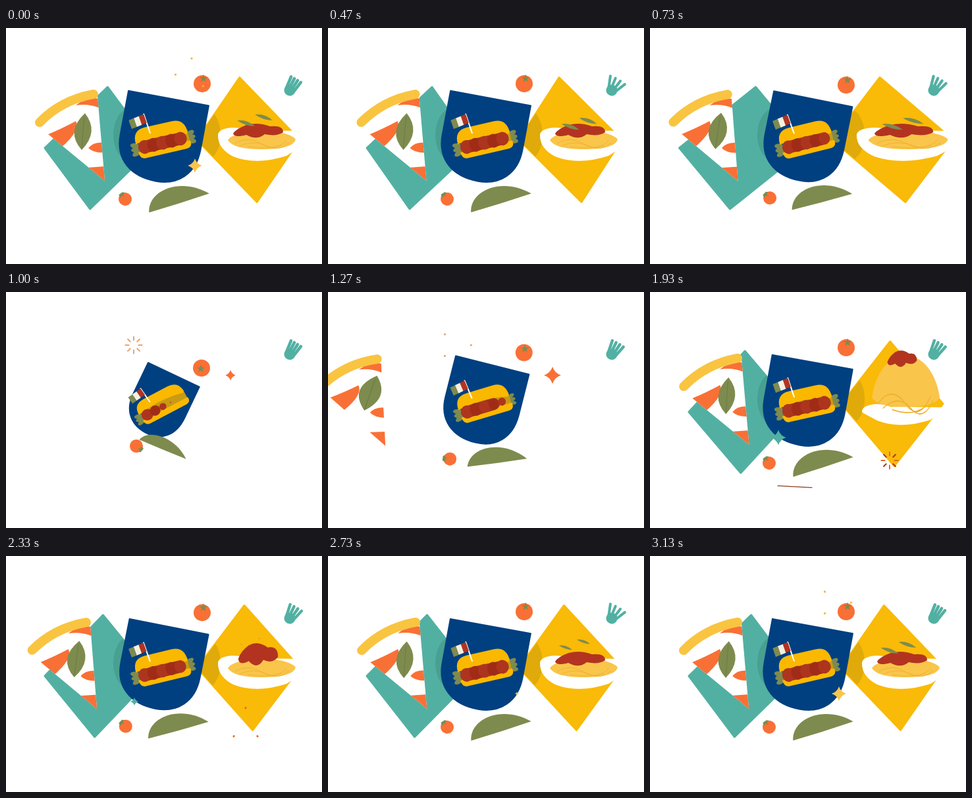
An HTML page with a canvas that plays this animation: 480x360 px, repeating every 3270 ms.

```html
<!DOCTYPE html>
<html lang="en">
<head>
<meta charset="utf-8">
<title>Street food</title>
<style>
  html, body { margin: 0; width: 100%; height: 100%; overflow: hidden; background: #fff; }
  canvas { display: block; }
</style>
</head>
<body>
<canvas id="stage" width="480" height="360"></canvas>
<script>
const ctx = document.getElementById('stage').getContext('2d');
const LOOP = 3270, STEPS = 41, { PI, sin, cos, exp, min, max } = Math;
const TEAL = '#52b0a2', GOLD = '#f9ba08', NAVY = '#004080', ORANGE = '#f97036',
      OLIVE = '#7e8b4e', RED = '#b23420', PASTA = '#f9c54a', WHITE = '#fff', TAN = '#dfa878';

// u: step since everything was hidden; away: springy distance from the rest
// pose (1 = hidden, 0 = at rest); out: the same without overshoot.
let u, away, out;

const ramp = (from, to) => min(1, max(0, (u - from) / (to - from)));
const pop = (from, steps) => 1 - (1 - ramp(from, from + steps)) ** 3;
const mix = (a, b, p) => a + (b - a) * p;
const age = start => (u - start + STEPS) % STEPS;

// Cards swing open, then pull wide before they snap shut.
function cardWidth(start) {
  const p = ramp(36, STEPS);
  return pop(start, 9) * (1 - p * p * (3.5 * p - 2.5));
}

function at(x, y, deg, sx, sy, draw) {
  ctx.save();
  ctx.translate(x, y);
  ctx.rotate(deg * PI / 180);
  ctx.scale(sx, sy);
  draw();
  ctx.restore();
}

function shape(d, color) {
  ctx.fillStyle = color;
  ctx.fill(new Path2D(d));
}

function line(d, color, width) {
  ctx.strokeStyle = color;
  ctx.lineWidth = width;
  ctx.stroke(new Path2D(d));
}

function oval(x, y, rx, ry, color, deg = 0) {
  ctx.fillStyle = color;
  ctx.beginPath();
  ctx.ellipse(x, y, rx, ry, deg * PI / 180, 0, 7);
  ctx.fill();
}

function diamond(x, y, lean, w, h, color, shadeX, shade) {
  if (w < 1) return;
  const d = `M${x + lean} ${y - h}L${x + w} ${y}L${x - lean} ${y + h}L${x - w} ${y}Z`;
  shape(d, color);
  line(d, color, 3);
  ctx.save();
  ctx.clip(new Path2D(d));
  oval(shadeX, 163, 25, 40, shade);
  ctx.restore();
}

function pizza() {
  at(95 - 230 * out - 12 * away, 118, 8 * away, 1, 1, () => {
    ctx.translate(-95, -118);
    const slice = 'M56 150Q90 112 139 104L150 233L64 162Z';
    shape(slice, WHITE);
    ctx.save();
    ctx.clip(new Path2D(slice));
    shape('M62 163Q86 153 106 142Q114 156 84 182Z', ORANGE);
    shape('M106 118Q122 104 142 108V122Q125 115 106 118Z', ORANGE);
    shape('M125 183Q133 173 150 175V190Q133 191 125 183Z', ORANGE);
    shape('M123 213L152 211V236Z', ORANGE);
    ctx.restore();
    line('M51 144Q84 110 133 101', '#f9c440', 14);
    at(117 + 30 * away, 158 - 20 * away, 48 * away, 1 + away, 1, () => {
      shape('M3-28Q25 0-2 28Q-27 0 3-28Z', OLIVE);
      line('M2-22Q0 0-2 26', '#6a7741', .8);
    });
  });
}

function plate() {
  const s = pop(3, 6);
  oval(386, 174, 37 * s, 30 * s, WHITE);
  oval(391, 175, 35 * s, 28 * s, '#fdf9f3');
  oval(390, 175, 28 * s, 23 * s, '#faf0df');
}

function pasta() {
  const settle = ramp(12, 17), spread = ramp(11, 22), grow = ramp(9, 12);
  const rim = mix(176, 157, settle);
  shape(`M322 ${rim + 7}C322 ${rim - 6} 350 ${rim - 8} 365 ${rim - 1}L456 ${rim}` +
        `V176L426 195Q380 210 345 196Q322 184 322 ${rim + 7}Z`, WHITE);

  const low = mix(175, 185, settle), top = mix(low - 78 * grow, 157, settle);
  const side = low - 14, crown = top - (side - top) / 3;
  shape(`M337 ${side}C350 ${crown} 426 ${crown} 440 ${side - 1}Q436 ${low} 388 ${low}Q345 ${low} 337 ${side}Z`, PASTA);
  at(388, low - 11, 0, 1, mix(2.2, 1, settle), () =>
    line('M-40 2Q-20-10 0 3T38-2M-34 6Q-10-4 8 6T42 1M-20 7Q10 12 30 5', '#eeb02f', .8));

  at(383, mix(101, 143, settle) + 14 * spread, 0, mix(.55, 1, spread), 1 + .6 * sin(PI * spread), () =>
    shape('M-38 4Q-34-3-18-9Q0-14 18-7Q38-9 38 2Q28 9 10 5Q-2 15-18 6Q-36 11-38 4Z', RED));

  const size = ramp(16, 24), drift = 17 * ramp(17, 34);
  for (const [x, y] of [[358, 135], [385, 126]]) {
    at(x + .6 * drift, y + .9 * drift, 12, size, size, () =>
      shape('M-14-1Q0-6 14 2Q0 5-14-1Z', OLIVE));
  }
}

function flag() {
  line('M-16-16L-19-46', WHITE, 2);
  [RED, '#f6f0e2', OLIVE].forEach((color, i) =>
    shape(`M${-19 - i * 8} ${-46 + i * 1.3}l-8.300 1.300l1.500 14l8.300-1.300Z`, color));
}

function hotdog() {
  for (const [x, size] of [[-42, 1], [42, 1 - out]]) {
    for (let i = -1; i < 2; i++) oval(x, 4 + i * 5.5, 8 * size, 4 * size, OLIVE, x * i * .5);
  }
  shape('M-36-8H40V12H-36Z', '#c99a14');
  shape('M-41-4Q-42-26-22-26H20Q39-26 40-5L38-2Q0-12-40-4Z', '#fbb800');
  shape('M-40 9H41Q43 20 32 20H-30Q-39 21-40 9Z', '#fbb800');
  line(`M-29 3H${mix(27, -29, out)}`, '#a5301a', 19);
  for (let i = 0; i < 5; i++) {
    const size = max(0, 1 - .1 * i * i * out);
    oval(-29 + i * 14, 3, 9.5 * size, 10.5 * size, i % 2 ? '#a02c18' : '#ad351e');
  }
  flag();
}

function badge() {
  const tilt = 15 * away;
  at(235 - 2 * out, 172, 10.5 + tilt, 1 - .3 * out, 1 - .23 * out, () => {
    const d = 'M-62-66H62V2C62 41 37 62 4 62C-36 62-62 40-62 2Z';
    shape(d, NAVY);
    line(d, NAVY, 2);
  });
  at(238, 172, -13 - tilt, 1 - .05 * out, 1 - .18 * out, hotdog);
}

function taco() {
  at(263 - 25 * out, 267 - 27 * out, -17.5 + 40 * away, 1 - .2 * out, 1 - .35 * out, () =>
    shape('M-48 0C-40-33 14-38 48 0Q0 1-48 0Z', OLIVE));
}

function tomatoes() {
  at(298 - out, 85 + 31 * out, 0, 1, 1, () => {
    oval(0, 0, 13, 13, ORANGE);
    ctx.translate(2 - 3 * out, -8 + 9 * out);
    for (let i = 0; i < 5; i++) {
      ctx.rotate(PI * .4);
      shape('M-2.200 0L0-6.500L2.200 0Z', OLIVE);
    }
  });
  at(181 + 17 * out, 261 - 26 * out, 235 - 195 * out, 1, 1, () => {
    oval(0, 0, 10, 10, ORANGE);
    shape('M11-4L6-5L7-1L4 1L8 2L8 5L11 3Z', OLIVE);
  });
}

// The tines open and close three times per loop.
function fork(step) {
  const open = (1 - cos(step * 6 * PI / STEPS)) / 2;
  at(431, 95, 30, 1, 1, () => {
    oval(0, 0, 8.5, 8.5, TEAL);
    for (let i = -1.5; i < 2; i++) {
      at(i * 4.2, -2, i * (5 + 10 * open), 1, 1, () => line('M0 3V-17', TEAL, 4.6 - open * .6));
    }
  });
}

function sparkle(x, y, start, size, color) {
  const r = age(start) < 12 ? size * sin(PI * age(start) / 12) : 0;
  at(x, y, 0, r, r, () => shape('M0-1Q.25-.25 1 0Q.25.25 0 1Q-.25.25-1 0Q-.25-.25 0-1Z', color));
}

// Eight rays fly outward and end as a few flickering crumbs.
function burst(x, y, start, ...colors) {
  const t = age(start), r = 27 * (1 - exp(-.4 * t));
  if (t < 1 || t > 9) return;
  for (let i = 0; i < 8; i++) {
    at(x, y, i * 45, 1, 1, () => {
      if (t < 5) line(`M${r * .5} 0H${r * .85}`, colors[i % 2], 2);
      else if ((i * 5 + u * 3) % 8 < 3) oval(r, 0, 1.7, 1.5, colors[0]);
    });
  }
}

function fallingStick() {
  if (u < 6 || u > 13) return;
  const t = u - 7, half = 39 - 2.6 * t;
  at(130 + 18 * t, 265 + 6.4 * t, 26 - 4.6 * t, 1, 1, () => line(`M${-half} 0H${half}`, '#8c3a1c', 1.2));
}

function draw(step) {
  u = (step - 13 + STEPS) % STEPS;
  away = exp(-.18 * u) * cos(.38 * u) + ramp(36, STEPS) ** 3;
  out = max(0, away);
  ctx.fillStyle = WHITE;
  ctx.fillRect(0, 0, 480, 360);
  ctx.lineCap = ctx.lineJoin = 'round';
  const lean = .63 * (u - 7), width = cardWidth(5);

  diamond(141, 183, lean, 82 * cardWidth(3), 93, TEAL, 188, '#48a092');
  pizza();
  diamond(368 + 8 * away, 170.5, -lean, 78 * width, 95, GOLD, 301, '#dfaa0a');
  at(368, 0, 0, u > 36 ? width : 1, 1, () => {
    ctx.translate(-368, 0);
    if (u > 9) pasta();
    else plate();
  });
  badge();
  taco();
  tomatoes();
  fork(step);
  fallingStick();

  sparkle(341, 127, 38.5, 13, ORANGE);
  sparkle(195, 222, 7, 12, TEAL);
  sparkle(287, 210, 21, 11, PASTA);
  burst(194, 81, 39, TAN, TAN);
  burst(364, 257, 10, '#e2682a', RED);
  burst(282, 71, 22, '#f3b63c', PASTA);
}

// Fifteen ticks a second; every sixth tick repeats the pose before it.
function frame(now) {
  const tick = min(48, Math.floor((now % LOOP + 4) * 15 / 1000));
  draw(tick - Math.floor(tick / 6));
  requestAnimationFrame(frame);
}
requestAnimationFrame(frame);
</script>
</body>
</html>
```
